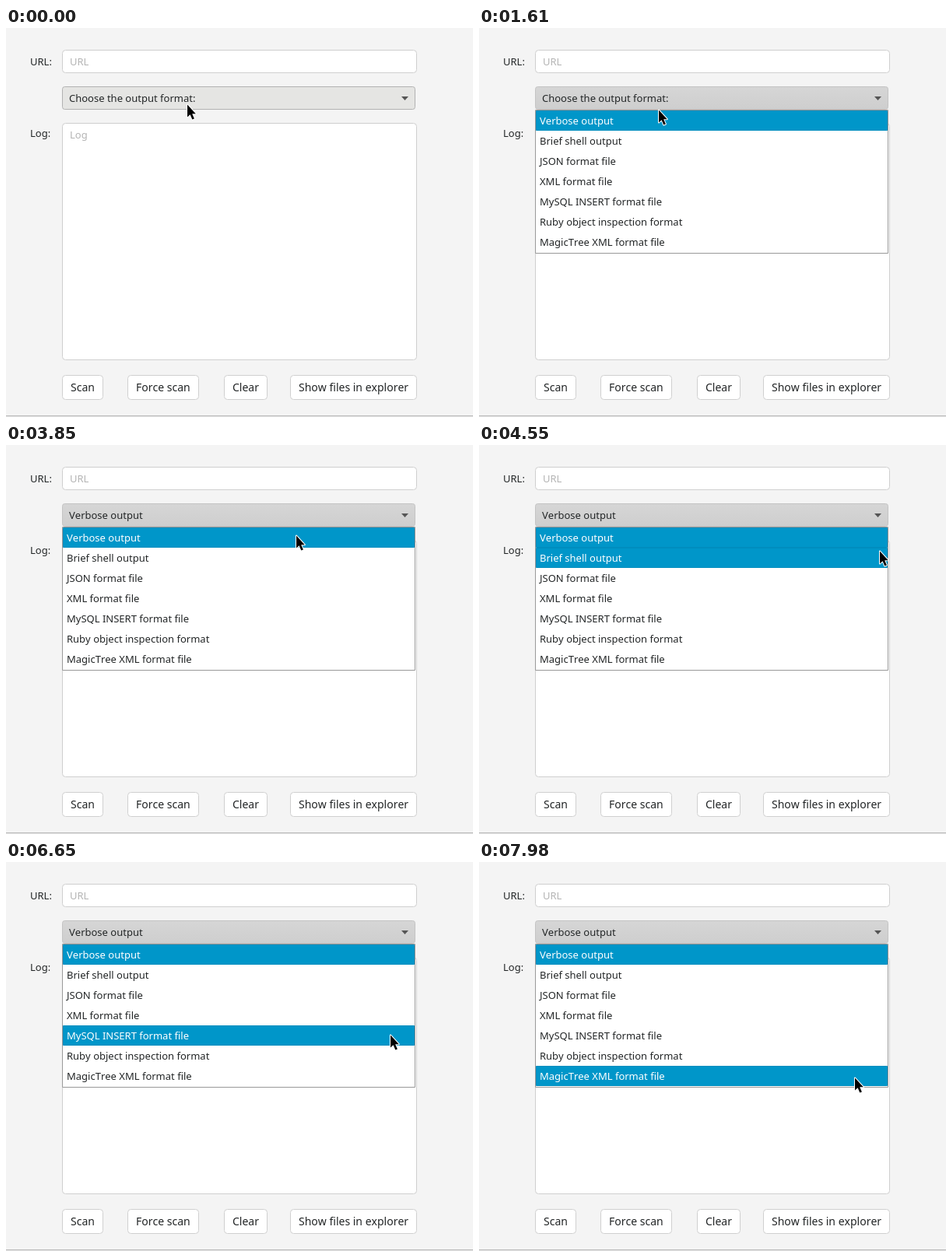
An HTML page with a canvas for the animation above (8000 ms loop, 600 by 500 pixels).

```html
<!DOCTYPE html>
<html lang="en">
<head>
<meta charset="utf-8">
<title>Scan form</title>
<style>
  html, body { margin: 0; width: 100%; height: 100%; overflow: hidden; background: #f4f4f4; }
  canvas { display: block; width: 600px; height: 500px; }
</style>
</head>
<body>
<canvas id="stage"></canvas>
<script>
const LOOP = 8000, STEP = 70;
const FONT = '"Noto Sans", "Open Sans", sans-serif';
const INK = '#232627', HINT = '#b4b4b4', BLUE = '#0096c9', BLUE_EDGE = '#008dbe';
const LEFT = 72, ROW_TOP = 106, ROW_H = 26;

// the menu opens, an option is chosen, the menu opens again
const OPEN = 1050, CHOOSE = 2380, REOPEN = 3010, PRESS_DELAY = 140;

const PROMPT = 'Choose the output format:';
const OPTIONS = [
  'Verbose output', 'Brief shell output', 'JSON format file', 'XML format file',
  'MySQL INSERT format file', 'Ruby object inspection format', 'MagicTree XML format file'
];
const BUTTONS = { 'Scan': 72, 'Force scan': 156, 'Clear': 280, 'Show files in explorer': 365 };

const canvas = document.getElementById('stage');
const ctx = canvas.getContext('2d');
const scale = window.devicePixelRatio || 1;
canvas.width = 600 * scale;
canvas.height = 500 * scale;
ctx.fontKerning = 'none';

const arrow = new Path2D('M0 -.5V15.5L3.6 12.2L6.3 18.6L8.9 17.5L6.2 11.3H10.8Z');
const triangle = new Path2D('M508 88H517L512.5 93Z');

const lerp = (a, b, k) => a + (b - a) * k;
const progress = (t, from, to) => Math.min(1, Math.max(0, (t - from) / (to - from)));
const ease = k => k * k * (3 - 2 * k);

function text(str, x, y, color = INK, size = 13) {
  ctx.font = `${size}px ${FONT}`;
  ctx.fillStyle = color;
  ctx.fillText(str, x, y);
}

function rect(x, y, w, h, color) {
  ctx.fillStyle = color;
  ctx.fillRect(x, y, w, h);
}

function box(x, y, w, h, r, fill, stroke) {
  ctx.beginPath();
  ctx.roundRect(x + 0.5, y + 0.5, w - 1, h - 1, r);
  ctx.fillStyle = fill;
  ctx.fill();
  ctx.lineWidth = 1;
  ctx.strokeStyle = stroke;
  ctx.stroke();
}

function field(label, y, h, baseline) {
  text(`${label}:`, 31, baseline);
  box(LEFT, y, 456, h, 4, '#fff', '#cfcfcf');
  text(label, LEFT + 10, y + 19.5, HINT);
}

function button(label, x) {
  ctx.font = `14px ${FONT}`;
  const w = Math.round(ctx.measureText(label).width) + 22;
  box(x, 446, w, 32, 4, '#fff', '#d0d0d0');
  text(label, x + 11, 467, INK, 14);
}

function drawForm() {
  rect(0, 0, 600, 500, '#f4f4f4');
  field('URL', 28, 30, 48);
  field('Log', 122, 305, 140);
  for (const label in BUTTONS) button(label, BUTTONS[label]);
  rect(0, 498, 600, 1, '#b8b8b8');
  rect(0, 499, 600, 1, '#e6e6e6');
}

function drawCombo(label, pressed) {
  let fill = '#e5e5e3';
  if (pressed) {
    fill = ctx.createLinearGradient(0, 75, 0, 105);
    fill.addColorStop(0, '#d6d6d6');
    fill.addColorStop(1, '#cecece');
  }
  box(LEFT, 75, 454, 30, 3, fill, pressed ? '#c4c4c4' : '#b2b2b2');
  text(label, LEFT + 9, 95);
  ctx.fillStyle = '#555';
  ctx.fill(triangle);
}

function drawMenu(selected, hovered) {
  box(LEFT, 105, 454, 185, 0, '#fff', '#999');
  OPTIONS.forEach((label, i) => {
    const y = ROW_TOP + i * ROW_H;
    const lit = i === selected || i === hovered;
    if (lit) box(LEFT + 1, y, 452, ROW_H, 0, BLUE, BLUE_EDGE);
    text(label, LEFT + 6, y + 18, lit ? '#fff' : INK);
  });
}

// rests on the combo, dips into the menu and back, sweeps right, then drifts down the list
function pointerAt(t) {
  const dip = ease(progress(t, 980, 1400)) - ease(progress(t, 2310, 2730));
  const sweep = progress(t, 3150, 4550);
  const drift = progress(t, 4550, 7980);
  const x = lerp(233, 231, progress(t, 0, 980)) + 284 * ease(sweep) - 32 * ease(drift);
  const y = lerp(99, 96, progress(t, 0, 980)) + 10 * dip + 41 * sweep + 141 * drift;
  return [Math.round(x), Math.round(y)];
}

function drawPointer(x, y) {
  ctx.save();
  ctx.translate(x, y);
  ctx.lineJoin = 'round';
  ctx.lineWidth = 2;
  ctx.strokeStyle = '#fff';
  ctx.stroke(arrow);
  ctx.fillStyle = '#000';
  ctx.fill(arrow);
  ctx.restore();
}

function render(time) {
  const t = Math.floor((time % LOOP) / STEP) * STEP;
  const [x, y] = pointerAt(t);
  const chosen = t >= CHOOSE;
  const opened = chosen ? REOPEN : OPEN;
  const open = t >= opened;

  ctx.setTransform(scale, 0, 0, scale, 0, 0);
  drawForm();
  drawCombo(chosen ? OPTIONS[0] : PROMPT, open && t >= opened + PRESS_DELAY);
  if (open) drawMenu(chosen ? 0 : -1, Math.floor((y - ROW_TOP) / ROW_H));
  drawPointer(x, y);
}

const start = performance.now();
function tick() {
  render(performance.now() - start);
  requestAnimationFrame(tick);
}
tick();
</script>
</body>
</html>
```
